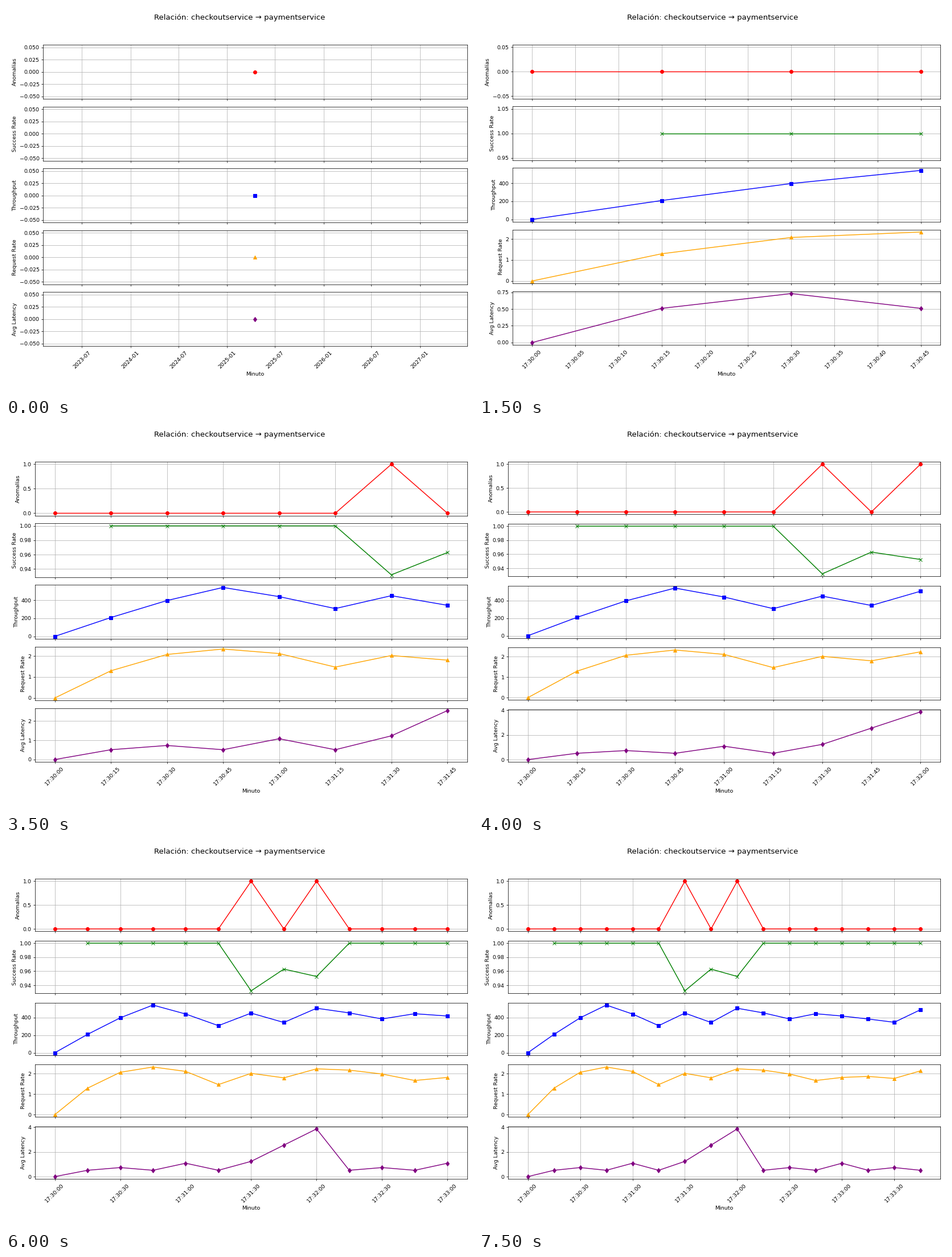
Recreate the animation shown at these times as a matplotlib script. Size 820 by 683 pixels, loop 8000 ms.

```python
import numpy as np
import matplotlib.pyplot as plt
from matplotlib.animation import FuncAnimation

plt.rcParams["font.family"] = "DejaVu Sans"

W, H = 820, 683
DPI = W / 12
STEPS = 16
INTERVAL = 500
TOP, RIGHT = 68.2, 809.6

step_ids = np.arange(STEPS)
TIMES = np.datetime64("2025-04-16T17:30:00") + 15 * step_ids.astype("timedelta64[s]")


def arcs(turns, power):
    """Join turning points: rises ease out, falls ease in."""
    out = np.zeros(STEPS)
    points = list(turns.items())
    for (a, u), (b, v) in zip(points, points[1:]):
        t = (step_ids[a:b + 1] - a) / (b - a)
        ease = 1 - (1 - t) ** power if v > u else t ** power
        out[a:b + 1] = u + (v - u) * ease
    return out


requests = arcs({0: 0, 3: 2.33, 5: 1.47, 6: 2.02, 7: 1.8, 8: 2.24,
                 11: 1.67, 13: 1.87, 14: 1.77, 15: 2.14}, power=2)
throughput = arcs({0: 0, 3: 540, 5: 307, 6: 449, 7: 343, 8: 504,
                   10: 383, 11: 442, 14: 345, 15: 487}, power=1.2)

# An incident spans steps 6 to 8
incident = (step_ids >= 6) & (step_ids <= 8)
anomalies = incident & (step_ids % 2 == 0)

success = np.ones(STEPS)
success[0] = np.nan
success[incident] = 0.932, 0.963, 0.9525

# Even steps run slower, every eighth one slower still
calm = np.where(step_ids % 2, 0.51, 0.73 + 0.35 * (step_ids % 8 == 4))
latency = np.where(incident, 1.23 + 1.31 * (step_ids - 6), calm)
latency[0] = 0

# label, values, marker, colour
SERIES = [
    ("Anomalías", anomalies.astype(float), "o", "red"),
    ("Success Rate", success, "x", "green"),
    ("Throughput", throughput, "s", "blue"),
    ("Request Rate", requests, "^", "orange"),
    ("Avg Latency", latency, "d", "purple"),
]


def layout(step):
    """Panel margins in pixels, turned into gridspec fractions."""
    left = 65.2 if step < 2 else 59.2 if step < 6 else 51.2
    bottom = 597.2 if step == 0 else 595.2
    gap = 13.57 if step < 8 else 16.6
    rows = len(SERIES)
    height = (bottom - TOP - (rows - 1) * gap) / rows
    return dict(left=left / W, right=RIGHT / W, top=1 - TOP / H,
                bottom=1 - bottom / H, hspace=gap / height)


fig = plt.figure(figsize=((W + 0.01) / DPI, (H + 0.01) / DPI), dpi=DPI)


def draw(step):
    fig.clear()
    fig.suptitle("Relación: checkoutservice → paymentservice", fontsize=14)
    axes = fig.subplots(len(SERIES), sharex=True, gridspec_kw=layout(step))
    n = step + 1
    for ax, (label, values, marker, color) in zip(axes, SERIES):
        ax.plot(TIMES[:n], values[:n], marker=marker, markersize=6.3, color=color)
        ax.set_ylabel(label)
        ax.locator_params(axis="y", nbins=5 if step == 0 else 4)
        ax.grid(True)
    axes[-1].set_xlabel("Minuto")
    axes[-1].tick_params(axis="x", rotation=45)
    return list(axes)


anim = FuncAnimation(fig, draw, frames=STEPS, interval=INTERVAL,
                     repeat=True, repeat_delay=0, blit=False)
plt.show()
```
